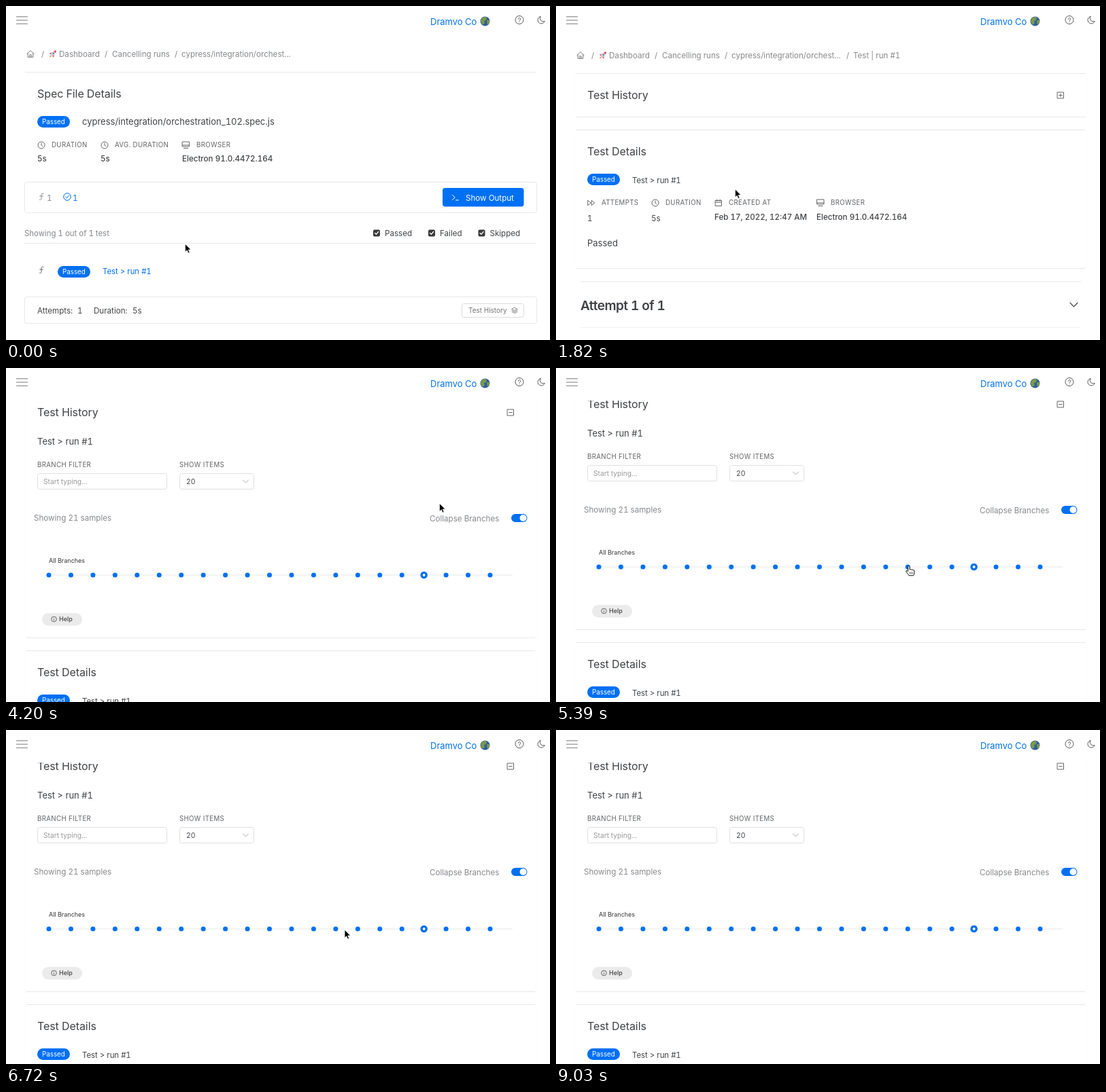
An HTML page that plays this animation: 800 by 492 pixels, repeating every 9100 ms.

```html
<!DOCTYPE html>
<html lang="en">
<head>
<meta charset="utf-8">
<title>Test history</title>
<style>
  html, body { margin: 0; width: 100%; height: 100%; overflow: hidden; background: #fff; }
  svg { display: block; width: 800px; height: 492px; }
  text { font-family: Inter, "Open Sans", sans-serif; font-variant-numeric: tabular-nums; white-space: pre; }
  .heading { letter-spacing: -.005em; }
  .label { letter-spacing: .35px; }
  .attempt { letter-spacing: -.03em; font-weight: 600; }
  .medium { font-weight: 500; }
  .bold { font-weight: 600; }
  .mono { font-family: "DejaVu Sans Mono", monospace; }
  .icon { fill: none; stroke-linecap: round; stroke-linejoin: round; }
</style>
</head>
<body>
<svg id="stage" viewBox="0 0 800 492"></svg>
<script>
const LOOP = 9100, STEP = 70;
const BASE = 11.6;
const BLUE = '#0070f3', DARK = '#3f4246', GRAY = '#85888c', RULE = '#e8e8e8';

// Text is placed by its left edge and the middle of its capitals.
const text = (x, y, str, fill = DARK, size = BASE, cls = '') =>
  `<text x="${x}" y="${y + size * .36}" font-size="${size}" fill="${fill}" class="${cls}">${str}</text>`;
const heading = (y, str) => text(46, y, str, DARK, 16, 'heading');
const label = (x, y, str) => text(x, y, str, '#606367', 9.7, 'label');
const icon = (x, y, d, color = '#666', width = 1) =>
  `<path class="icon" transform="translate(${x} ${y})" d="${d}" stroke="${color}" stroke-width="${width}"/>`;
const circle = (x, y, r, fill, attrs = '') => `<circle cx="${x}" cy="${y}" r="${r}" fill="${fill}" ${attrs}/>`;
const ring = (x, y, r, color = '#666', width = 1) => circle(x, y, r, 'none', `stroke="${color}" stroke-width="${width}"`);
const box = (x, y, w, h, r, fill, stroke = 'none') =>
  `<rect x="${x}" y="${y}" width="${w}" height="${h}" rx="${r}" fill="${fill}" stroke="${stroke}"/>`;
const rule = (x1, x2, y, color = RULE) => `<path d="M${x1} ${y}H${x2}" stroke="${color}"/>`;
const card = (top, bottom) =>
  box(27.5, top, 753, bottom - top, 4, '#fff', '#fcfcfc') + rule(30, 778, top) + rule(30, 778, bottom);
const badge = (x, y) => box(x, y - 8.5, 48, 17, 8.5, BLUE) + text(x + 7, y, 'Passed', '#fff', 9.8);
const group = (id, content) => `<g id="${id}">${content}</g>`;

const SHAPE = {
  func: 'M3-4.5c-2-1-3 0-3 2v4.5c0 2-1 3-2.5 2.3M-2.3-1h4.6',
  home: 'M-5 0L0-5 5 0M-3.8-1V4.8H3.8V-1M-1.2 4.8V1.3H1.2V4.8',
  clockHands: 'M0-3V0L2 1.6',
  monitor: 'M-5-4.5H5V2.5H-5ZM-3 5H3M-5 .5H5',
  forward: 'M-5-3.5L-.7 0-5 3.5ZM.5-3.5L4.8 0 .5 3.5Z',
  calendar: 'M-4.5-3.5h9v8h-9ZM-4.5-.8h9M-2.2-5v2.5M2.2-5v2.5',
  square: 'M-4.5-4.5h9v9h-9ZM-2.3 0h4.6',
  plus: 'M0-2.3v4.6',
  check: 'M-2.4 0L-.6 1.9 2.6-2',
  chevron: 'M-4-2L0 2 4-2',
  prompt: 'M-4.5-3.5L-.8 0-4.5 3.5M.5 4H4.5',
  layers: 'M0-4L4-2 0 0-4-2ZM-4 0L0 2 4 0M-4 2L0 4 4 2'
};

const clock = (x, y) => ring(x, y, 5) + icon(x, y, SHAPE.clockHands);

function breadcrumb(y, extra = '') {
  const slash = x => text(x, y, '/', GRAY);
  const rocket = `<g transform="translate(69 ${y}) rotate(45)">
    <path d="M-2-1L-4.5 3-2 3ZM2-1L4.5 3 2 3Z" fill="#e0405a"/>
    <path d="M0-7Q3.2-3 2 3.5H-2Q-3.2-3 0-7Z" fill="#c9ced8"/>
    <path d="M0-7Q1.6-5.2 2-3.6H-2Q-1.6-5.2 0-7Z" fill="#e0405a"/>
    <circle cy="-1" r="1.1" fill="#4b7396"/><path d="M-1.5 4H1.5L0 7.5Z" fill="#f0a060"/></g>`;
  return icon(36, y, SHAPE.home, '#777') + slash(52) + rocket + text(78, y, 'Dashboard', GRAY) +
    slash(145) + text(156, y, 'Cancelling runs', GRAY) + slash(248) +
    text(258, y, 'cypress/integration/orchest...', GRAY) +
    (extra && slash(427) + text(437, y, extra, GRAY));
}

function specPage() {
  const filter = (x, str) => box(x, 329.5, 10, 10, 2, '#3a3a3a') +
    icon(x + 5, 334.5, SHAPE.check, '#fff', 1.3) + text(x + 17, 335, str);
  return breadcrumb(70.5) + rule(28, 780, 97.5) + heading(129.5, 'Spec File Details') +
    badge(46, 170.5) + text(112, 170.5, 'cypress/integration/orchestration_102.spec.js', DARK, 13) +
    clock(52, 205) + label(67, 205, 'DURATION') + text(46, 225, '5s', DARK, BASE, 'medium') +
    clock(145, 205) + label(160, 205, 'AVG. DURATION') + text(139, 225, '5s', DARK, BASE, 'medium') +
    icon(264.5, 204.5, SHAPE.monitor) + label(280, 205, 'BROWSER') +
    text(259, 225, 'Electron 91.0.4472.164', DARK, BASE, 'medium') +
    box(27.5, 259.5, 753, 45, 3, '#fff', RULE) +
    icon(52, 281, SHAPE.func, GRAY) + text(60, 282.5, '1', GRAY) +
    ring(90, 281, 5.3, BLUE) + icon(90, 281, SHAPE.check, BLUE) + text(98, 282.5, '1', BLUE) +
    box(642, 268, 119.5, 27.5, 4, BLUE) + icon(661, 282, SHAPE.prompt, '#fff') +
    text(676, 282.5, 'Show Output', '#fff') +
    text(27, 335, 'Showing 1 out of 1 test', GRAY, 11.4) +
    filter(540, 'Passed') + filter(621, 'Failed') + filter(694.5, 'Skipped') + rule(27, 780, 349.5) +
    icon(52, 389, SHAPE.func) + badge(76, 391.5) + text(142, 391, 'Test > run #1', BLUE, 11.4) +
    box(27.5, 428.5, 753, 39, 3, '#fff', RULE) + text(46, 448.5, 'Attempts:') + text(105, 448.5, '1') +
    text(129, 448.5, 'Duration:') + text(186, 448.5, '5s') +
    box(670.5, 438.5, 91, 20, 3, '#fff', '#dcdcdc') + text(680, 448.5, 'Test History', '#707377', 10) +
    icon(748, 448.5, SHAPE.layers, '#777', .9);
}

const dotX = i => 63 + i * 32.45;

function historyBody() {
  const dots = Array.from({ length: 21 }, (_, i) => i === 17
    ? circle(dotX(i), 371, 5.3, BLUE) + circle(dotX(i), 371, 1.9, '#fff')
    : circle(dotX(i), 371, 3.5, BLUE, `id="dot${i}"`)).join('');
  return text(46, 174, 'Test > run #1', DARK, 13) +
    label(46, 208.5, 'BRANCH FILTER') + label(255, 208.5, 'SHOW ITEMS') +
    box(46.5, 221.5, 190, 23, 3, '#fff', '#e0e0e0') + text(55, 233, 'Start typing...', '#999', 10.2) +
    box(255.5, 221.5, 109, 23, 3, '#fff', '#e0e0e0') + text(265, 233, '20', DARK, 10.4) +
    icon(352.5, 233, SHAPE.chevron, '#aaa') +
    text(41, 286.5, 'Showing 21 samples', GRAY) + text(623, 287.5, 'Collapse Branches', GRAY) +
    `<rect id="track" x="743" y="281" width="23.5" height="12" rx="6"/>` +
    circle(749, 287, 5, '#fff', 'id="knob"') +
    text(63, 349.5, 'All Branches', '#333', 9) + rule(63, 745, 371) + dots +
    group('scrollbar', box(758, 316, 6.5, 65, 3, '#7f7f7f')) +
    box(53, 427, 59, 18.5, 9.25, '#ebebeb') + ring(70.5, 436, 3.8, '#555', .9) +
    icon(70.5, 436, 'M0-1.8v0M0 0v1.8', '#555', .9) + text(78, 436, 'Help', '#444', 9, 'medium');
}

function details() {
  return card(182.5, 386.5) + heading(214.5, 'Test Details') +
    badge(46, 255.5) + text(112, 256.5, 'Test > run #1', DARK, 11.4) +
    icon(52, 290, SHAPE.forward) + label(67, 290, 'ATTEMPTS') + text(46, 312.5, '1') +
    clock(146, 290) + label(161, 290, 'DURATION') + text(140, 312.5, '5s') +
    icon(239, 290, SHAPE.calendar) + label(254, 290, 'CREATED AT') +
    text(233, 310.5, 'Feb 17, 2022, 12:47 AM', DARK, BASE, 'medium') +
    icon(389, 289.5, SHAPE.monitor) + label(404, 290, 'BROWSER') +
    text(383, 310.5, 'Electron 91.0.4472.164', DARK, BASE, 'medium') +
    text(46, 349.5, 'Passed', DARK, 13) +
    rule(36, 772, 406) + text(36, 441, 'Attempt 1 of 1', DARK, 19, 'attempt') +
    icon(761.5, 440, 'M-5.5-2.8L0 2.8 5.5-2.8', '#333', 1.2) + rule(36, 772, 473.5, '#f0f0f0');
}

function header() {
  return box(0, 0, 800, 48, 0, '#fff') + icon(15.5, 21, 'M0-5.2H16M0 0H16M0 5.2H16', '#777') +
    text(624, 23, 'Dramvo Co', BLUE, 13) + circle(704.5, 22.5, 7, '#2f5f9e') +
    '<path d="M699 19q4-5 8-2l-1 4-3 1 1 3-3 3q-2-3-3-5ZM707 21l4 0v4l-3 3Z" fill="#7b9a4a"/>' +
    ring(755, 20.5, 6, '#555') + icon(755, 20.5, 'M-1.7-1.2a1.7 1.7 0 1 1 2.6 1.4Q0 .6 0 1.3M0 3v0', '#555') +
    icon(787, 20.5, 'M-1.2-5A5.3 5.3 0 1 0 5.2 2 5 5 0 0 1-1.2-5Z', '#555');
}

function tooltip() {
  return box(10, 8, 280, 131.5, 2, '#fff', '#f4f4f4') + rule(10, 290, 139.5, '#cfcfcf') + badge(17, 21.5) +
    '<g id="tipDate"></g>' + text(17, 87.5, 'Branch: cancel-runs', '#555') +
    text(17, 108.5, 'Commit Message:', '#555') +
    text(17, 129.5, 'Cancel runs integrations', '#555', 8.53, 'mono');
}

const arrow = '<path d="M0 0V11.8L2.7 9.3 4.6 13.6 6.6 12.7 4.7 8.5H8.5Z" fill="#000" stroke="#fff" stroke-width=".7"/>';
const hand = `<path d="M-1.2 8V1.2a1.2 1.2 0 0 1 2.4 0V5.5q2-1 2.6.3 1.8-.8 2.4.5 2-.5 2 1.2v3q0 2-1.4 3.8H.2
  Q-1 12-4 8.8q-.6-1.8 1.2-1.6Z" fill="#fff" stroke="#111" stroke-linejoin="round"/>
  <path d="M1.6 9v3M3.7 9v3M5.8 9v3" stroke="#111" stroke-width=".7"/>`;

stage.innerHTML =
  group('spec', specPage()) +
  group('test', breadcrumb(72.5, 'Test | run #1') +
    group('closedCard', card(99.5, 163.5)) + group('openCard', card(99.5, 463.5) + historyBody()) +
    heading(131.5, 'Test History') + icon(742, 131.5, SHAPE.square) + group('plus', icon(742, 131.5, SHAPE.plus)) +
    group('details', details())) +
  header() + group('tip', tooltip()) +
  circle(0, 0, 20, 'none', 'id="ripple" stroke="#8bbaf3" stroke-width="3"') +
  group('cursor', group('arrow', arrow) + group('hand', hand));

const $ = id => document.getElementById(id);
const show = (id, on) => $(id).style.display = on ? '' : 'none';
const move = (id, x, y) => $(id).setAttribute('transform', `translate(${x} ${y})`);
const within = (t, [from, to]) => t >= from && t < to;

const PAGE_OPENS = 840, HISTORY_OPENS = 2870, TOGGLES = 3640;
const cursorPath = [
  [70, 263.5, 350.5], [560, 180, 390], [1400, 180, 390], [1820, 263.5, 270], [2380, 722, 140],
  [2590, 736, 133], [3220, 736, 133], [3500, 754, 286], [3780, 754, 286], [4200, 637.5, 199.5],
  [4900, 560, 270], [5460, 513, 294.5], [6580, 513, 294.5], [7140, 453, 294], [7560, 453, 292.5],
  [8260, 453, 292.5], [8750, 500, -20]
];
const scrollPath = [[3850, 0], [4200, 66], [4340, 78]];
const clicks = [[700, 910, 180, 390], [2870, 3220, 734, 133], [3570, 3780, 754, 286]];
const handTimes = [[560, 840], [2520, 3220], [3430, 3850], [5390, 6650], [7070, 8330]];
const hovers = [
  { time: [5460, 6650], dot: 14, date: 'Feb 16, 2022, 10:42 PM', duration: '5s' },
  { time: [7070, 8330], dot: 12, date: 'Feb 16, 2022, 10:30 PM', duration: '5.1s' }
];

// Values along a list of [time, ...values] keys, straight between keys.
function along(path, t) {
  const next = path.findIndex(key => key[0] > t);
  if (next === 0) return path[0].slice(1);
  if (next < 0) return path.at(-1).slice(1);
  const a = path[next - 1], b = path[next], p = (t - a[0]) / (b[0] - a[0]);
  return a.slice(1).map((v, i) => v + (b[i + 1] - v) * p);
}

function draw(t) {
  const open = t >= HISTORY_OPENS, collapsed = t >= TOGGLES;
  show('spec', t < PAGE_OPENS);
  show('test', t >= PAGE_OPENS);
  show('closedCard', !open);
  show('openCard', open);
  show('plus', !open);
  show('scrollbar', !collapsed);
  $('track').setAttribute('fill', collapsed ? BLUE : '#e4e4e4');
  $('knob').setAttribute('cx', collapsed ? 760.5 : 749);
  move('details', 0, open ? 300 : 0);
  move('test', 0, -Math.round(along(scrollPath, t)[0]));

  const [x, y] = along(cursorPath, t);
  const pointing = handTimes.some(span => within(t, span));
  move('cursor', x, y);
  show('hand', pointing);
  show('arrow', !pointing);

  const click = clicks.find(span => within(t, span));
  show('ripple', click);
  if (click) move('ripple', click[2], click[3]);

  const hover = hovers.find(h => within(t, h.time));
  for (const h of hovers) $('dot' + h.dot).setAttribute('r', h === hover ? 5.2 : 3.5);
  show('tip', hover);
  if (hover) {
    move('tip', x, y);
    $('tipDate').innerHTML = text(17, 45, hover.date, '#4a4d50', BASE, 'bold') +
      text(17, 66.5, 'Duration: ' + hover.duration, '#555');
  }
}

const start = performance.now();
function tick() {
  const t = (performance.now() - start) % LOOP;
  draw(Math.floor(t / STEP) * STEP);
  requestAnimationFrame(tick);
}
tick();
</script>
</body>
</html>
```
